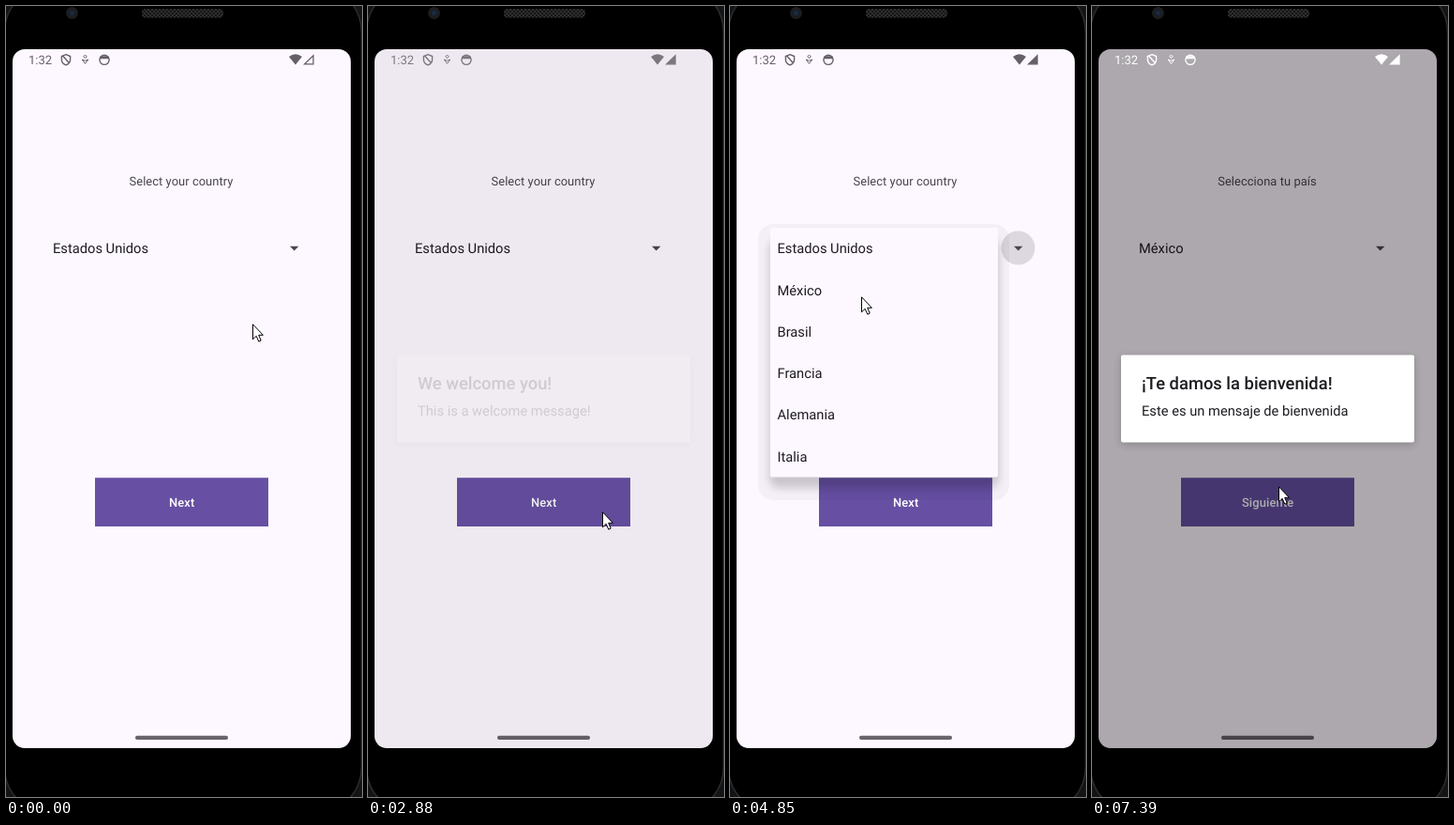
An HTML page for the animation above (8000 ms loop, 380 by 842 pixels).

```html
<!DOCTYPE html>
<html lang="en">
<head>
<meta charset="utf-8">
<title>Country picker</title>
<style>
html, body { margin: 0; height: 100%; overflow: hidden; background: #000; }
svg { display: block; width: 380px; height: 842px; }
text { font: 14.7px Roboto, sans-serif; fill: #1d1b20; text-rendering: geometricPrecision; }
#prompt { font-size: 12.9px; letter-spacing: .06px; fill: #49454f; }
#action { font-size: 12.9px; font-weight: 500; letter-spacing: .15px; fill: #fff; }
#title { font-size: 18.35px; font-weight: 500; }
#clock { font-size: 13px; fill: currentColor; }
.mid { text-anchor: middle; }
</style>
</head>
<body>
<svg viewBox="0 0 380 842">
  <defs>
    <filter id="soft" x="-20%" y="-20%" width="140%" height="140%"><feGaussianBlur stdDeviation="4"/></filter>
    <pattern id="mesh" width="4" height="4" patternUnits="userSpaceOnUse">
      <path d="M0 0L4 4M4 0L0 4" stroke="#353537" stroke-width=".8"/>
    </pattern>
    <clipPath id="glass"><rect x="7" y="46" width="361" height="744" rx="13"/></clipPath>
  </defs>

  <!-- phone body -->
  <rect width="380" height="842" fill="#131416"/>
  <rect x="-1.5" y="-22" width="381" height="882" rx="50" stroke="#292b2e" stroke-width="1.5"/>
  <circle cx="70.5" cy="7.5" r="6.5" fill="#1b1d20"/>
  <circle cx="70.5" cy="7.5" r="2.5" fill="#1a2a45"/>
  <rect x="145" y="3" width="87" height="9.5" rx="4" fill="#171718"/>
  <rect x="145" y="3" width="87" height="9.5" rx="4" fill="url(#mesh)"/>

  <g clip-path="url(#glass)">
    <rect x="7" y="46" width="361" height="744" fill="#fdf7ff"/>
    <text id="prompt" class="mid" x="187" y="191.3"></text>
    <text id="country" x="50" y="263.3"></text>
    <circle id="ripple" cx="307.5" cy="257.5" fill="#1d1b20"/>
    <path d="M303 255.7h9.4l-4.7 4.8z" fill="#49454f"/>
    <rect x="95" y="502.2" width="185" height="51.8" fill="#6750a4"/>
    <text id="action" class="mid" x="187.7" y="533"></text>
    <rect x="138" y="776.7" width="99" height="4.3" rx="2" fill="#69646c"/>

    <!-- fades by fill-opacity, so the shadow shows through the sheet -->
    <g id="menu">
      <rect x="30" y="232" width="268" height="294" rx="16" opacity=".035"/>
      <rect x="42" y="248" width="245" height="265" rx="10" opacity=".17" filter="url(#soft)"/>
      <rect x="43" y="236" width="243" height="265.5" rx="2" fill="#fdf7ff"/>
    </g>

    <rect id="dim" x="7" y="46" width="361" height="744"/>
    <g id="dialog">
      <rect x="31" y="374" width="313" height="93" rx="4" opacity=".2" filter="url(#soft)"/>
      <rect x="31" y="371.5" width="313" height="93" rx="2" fill="#fff"/>
      <text id="title" x="53" y="408"></text>
      <text id="message" x="53" y="436.3"></text>
    </g>

    <g id="status" fill="none" stroke="currentColor" stroke-width="1.4">
      <text id="clock" x="24" y="62" stroke="none">1:32</text>
      <path d="M64 51.7l4.6 1.8v3.4c0 2.8-1.9 4.9-4.6 5.9c-2.7-1-4.6-3.1-4.6-5.9v-3.4zM60.5 53l7.2 8"/>
      <path d="M84.5 52l1.7 1.8l-1.7 1.8l-1.7-1.8zM81.2 57l3.3 4.4l3.3-4.4l-3.3 1.3z" stroke-width="1"/>
      <circle cx="105" cy="57.3" r="5.1"/>
      <path d="M100.5 53.2h9v3h-9z" fill="currentColor" stroke="none"/>
      <path d="M302 54q7-5.4 14 0l-7 8.5z" fill="currentColor" stroke="none"/>
      <path id="signal" d="M328 52.8v9h-9.3z" stroke-width="1.3"/>
    </g>
  </g>

  <path id="cursor" d="M.5 .8V16.8L4.2 13.3L6.8 19.2L9.2 18.1L6.7 12.3H11.4Z" fill="#fff" stroke="#000"/>
</svg>
<script>
const LOOP = 8000;
const $ = id => document.getElementById(id);
const show = (id, alpha, kind = "opacity") => $(id).setAttribute(kind, alpha);
const countries = ["Estados Unidos", "México", "Brasil", "Francia", "Alemania", "Italia"];
const english = {
  prompt: "Select your country", country: "Estados Unidos", action: "Next",
  title: "We welcome you!", message: "This is a welcome message!"
};
const spanish = {
  prompt: "Selecciona tu país", country: "México", action: "Siguiente",
  title: "¡Te damos la bienvenida!", message: "Este es un mensaje de bienvenida"
};

// each pointer move eases along a curve; via is its control point
const home = [263, 338];
const moves = [
  { from: 20, to: 50, end: [261, 338] },
  { from: 260, to: 650, end: [173, 263], via: [250, 350] },
  { from: 1800, to: 2570, end: [250, 538], via: [446, 316] },
  { from: 2950, to: 3570, end: [220, 508], via: [309, 664] },
  { from: 4130, to: 4420, end: [146, 264] },
  { from: 4650, to: 4850, end: [140, 309] },
  { from: 5450, to: 6090, end: [234, 531], via: [205, 390] },
  { from: 6850, to: 7390, end: [199, 511] }
];

countries.forEach((name, i) => {
  $("menu").insertAdjacentHTML("beforeend", `<text x="50.5" y="${263.3 + i * 44.25}">${name}</text>`);
});

const ramp = (t, start, length) => Math.min(1, Math.max(0, (t - start) / length));
const pulse = (t, start, rise, end, fall) => ramp(t, start, rise) - ramp(t, end, fall);
const ease = k => k * k * (3 - 2 * k);

function pointer(t) {
  let tip = home;
  for (const { from, to, end, via = end } of moves) {
    if (t < from) break;
    const k = ease(ramp(t, from, to - from));
    tip = tip.map((p, i) => (1 - k) ** 2 * p + 2 * k * (1 - k) * via[i] + k * k * end[i]);
  }
  return tip.map(Math.round);
}

function draw(t) {
  const words = t < 5400 ? english : spanish;
  for (const id in words) $(id).textContent = words[id];

  const menu = pulse(t, 1000, 150, 2263, 150) + pulse(t, 4650, 150, 5360, 150);
  show("menu", menu, "fill-opacity");

  const tap = t < 3000 ? t - 940 : t - 4590;
  $("ripple").setAttribute("r", 8 + 10 * ramp(tap, 0, 200));
  show("ripple", .14 * pulse(tap, 0, 80, 320, 230));

  const dialog = pulse(t, 2860, 150, 4040, 150) + ramp(t, 6620, 150);
  show("dialog", dialog);
  show("dim", .32 * (pulse(t, 2840, 220, 4040, 220) + ramp(t, 6600, 220)));
  const mix = c => Math.round(c + (255 - c) * dialog);
  $("status").style.color = `rgb(${mix(101)},${mix(95)},${mix(104)})`;
  $("signal").setAttribute("fill", t < 2800 ? "none" : "currentColor");

  $("cursor").setAttribute("transform", `translate(${pointer(t)})`);
}

function tick(now) {
  draw(now % LOOP);
  requestAnimationFrame(tick);
}
draw(0);
requestAnimationFrame(tick);
</script>
</body>
</html>
```
